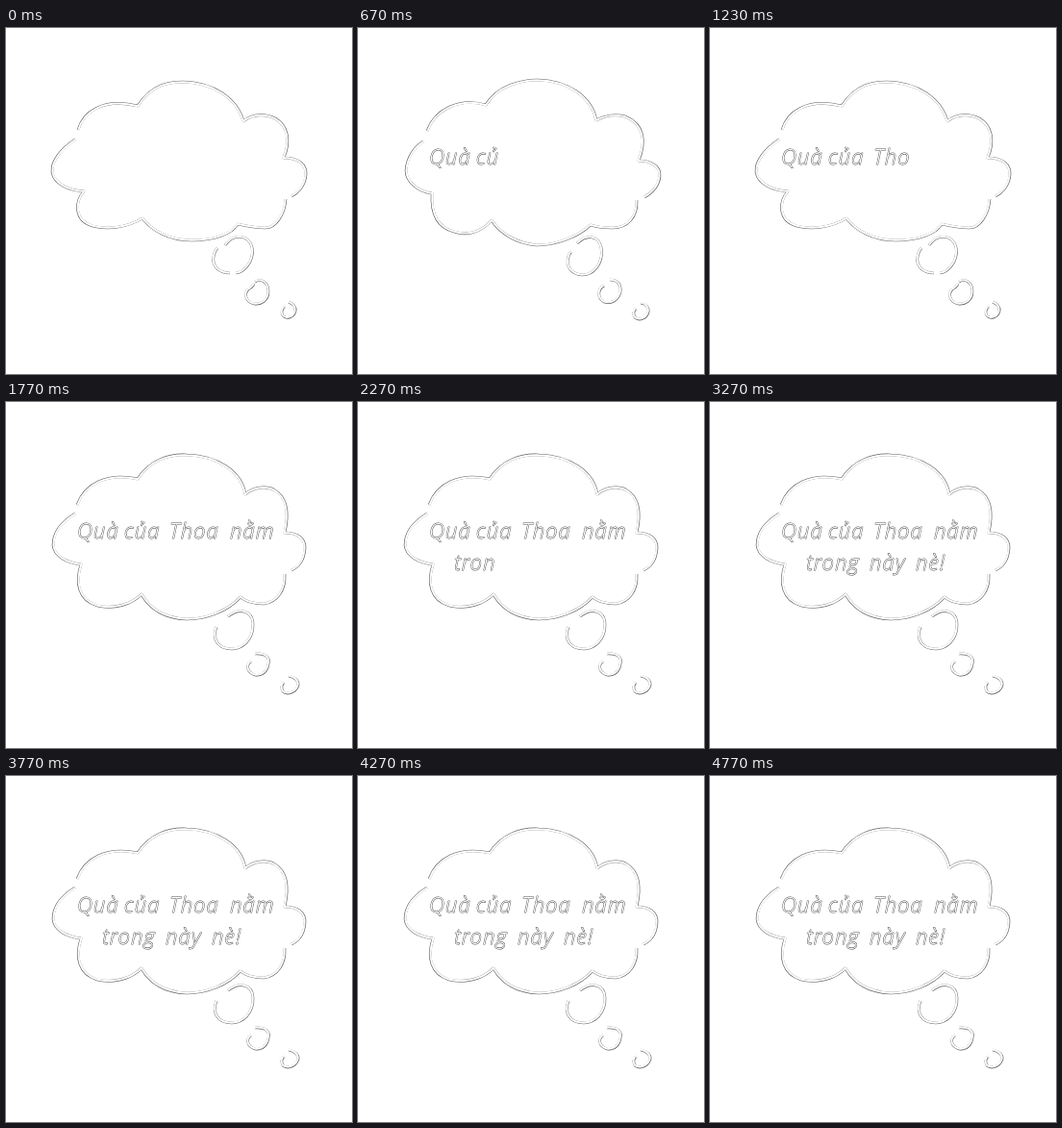
Recreate the animation shown at these times as an HTML page. Size 360 by 360 pixels, loop 5010 ms.

```html
<!DOCTYPE html>
<html lang="vi">
<head>
<meta charset="utf-8">
<title>Thought bubble</title>
<style>
  html, body { margin: 0; width: 100%; height: 100%; overflow: hidden; background: #fff; }
  svg { display: block; width: 100vw; height: 100vh; }
  path { fill: none; stroke-linejoin: round; }
  .edge { stroke: #606060; stroke-width: 2.6; }
  /* Pulled slightly inwards so the outer side of the line reads darker. */
  .core { stroke: #fff; stroke-width: 2; transform: scale(.997); transform-origin: 180px 140px; }
  text {
    font: italic 300 22px "Open Sans", "Noto Sans", sans-serif;
    letter-spacing: 1.2px;
    fill: #fff;
    stroke: #4c4c4c;
    stroke-width: .9;
    stroke-linejoin: round;
    paint-order: stroke;
  }
</style>
</head>
<body>
<svg viewBox="0 0 360 360">
  <path class="edge"/>
  <path class="core"/>
  <g id="words"></g>
</svg>
<script>
const LOOP = 5010;

const left = {
  cloud: `M75 106C80 88 100 72 137 81C152 58 170 56 185 56C215 57 240 72 247 97
    C258 88 272 90 280 94C294 102 296 118 289 135C304 135 313 142 312 153C311 165 303 172 297 175
    M291 178C290 195 280 208 270 208C260 208 250 206 241 204C235 215 215 221 193 221
    C170 221 152 211 142 198C125 208 105 210 90 206C70 200 72 180 81 170
    C65 169 50 162 48 150C47 138 58 125 72 116`,
  bubbles: `M228 226C236 214 252 214 256 228C259 245 245 255 239 255M233 255C222 255 214 248 216 238
    Q217 232 220 229M259 264C266 260 273 265 273 274C273 284 265 288 258 287C250 285 247 277 252 272Q257 269 258 266
    M294 285C299 287 302 290 301 295C299 302 291 303 288 299C286 296 287 292 290 290`
};
const right = {
  cloud: `M72 107C80 85 105 72 133 80C145 60 170 54 187 54C220 55 243 72 248 96
    C258 90 270 90 278 92C298 100 300 118 292 138C306 138 315 145 314 154C313 165 305 172 298 176
    M290 179C291 197 280 208 265 208C255 208 248 207 242 205C228 218 205 226 186 226
    C165 224 148 214 139 200C127 214 112 216 100 212C80 207 76 190 77 172
    C62 170 50 160 50 148C51 135 58 124 68 118`,
  bubbles: `M228 224C238 214 250 216 253 228C256 245 245 257 233 257C221 256 216 247 219 238Q220 234 222 233
    M262 262C271 262 274 268 273 275C270 285 262 287 256 285C249 281 249 272 256 268
    M294 286C300 287 303 291 302 296C300 303 292 305 288 301C286 297 287 294 289 292`
};
const middle = {
  cloud: `M74 107C82 85 105 73 137 80C150 60 170 54 188 55C220 56 245 72 249 96
    C258 88 272 87 280 92C293 100 294 118 290 136C303 136 312 142 311 153C310 165 304 172 297 175
    M290 179C291 195 283 208 268 210C258 210 250 208 244 203C230 218 208 226 188 226
    C165 225 150 216 141 200C130 211 112 216 95 212C75 206 72 188 78 169
    C62 167 50 160 49 149C49 137 57 125 72 116`,
  bubbles: `M231 223C244 213 256 218 257 230C258 247 246 257 235 257C220 257 214 246 219 234
    M259 262C270 261 275 266 273 273C271 283 264 285 259 284C250 281 250 273 255 270
    M294 285C300 286 305 290 304 295C301 303 292 305 288 301C286 297 287 294 289 292`
};
const poses = [left, middle, right, middle];

// Each word: text, x, baseline, and when its letters appear.
const words = [
  ["Quà", 74, 142, [130, 230, 340]],
  ["của", 123, 142, [570, 670, 800]],
  ["Thoa", 170, 142, [1000, 1100, 1230, 1330]],
  ["nằm", 233, 142, [1530, 1670, 1770]],
  ["trong", 100, 175, [1970, 2070, 2170, 2270, 2370]],
  ["này", 166, 175, [2600, 2700, 2800]],
  ["nè!", 214, 175, [3030, 3130, 3230]]
].map(([text, x, y, times]) => {
  const node = document.createElementNS("http://www.w3.org/2000/svg", "text");
  node.setAttribute("x", x);
  node.setAttribute("y", y);
  document.getElementById("words").append(node);
  return { text, times, node };
});

const outlines = document.querySelectorAll("path");
let shownPose;

function draw(t) {
  const step = 2 * Math.floor(t / 500) + (t % 500 >= 270 ? 1 : 0);
  const pose = poses[step % poses.length];
  if (pose !== shownPose) {
    outlines.forEach(path => path.setAttribute("d", pose.cloud + pose.bubbles));
    shownPose = pose;
  }
  for (const { text, times, node } of words) {
    const typed = text.slice(0, times.filter(time => time <= t).length);
    if (node.textContent !== typed) node.textContent = typed;
  }
}

const start = performance.now();
function tick() {
  draw((performance.now() - start) % LOOP);
  requestAnimationFrame(tick);
}
tick();
</script>
</body>
</html>
```
